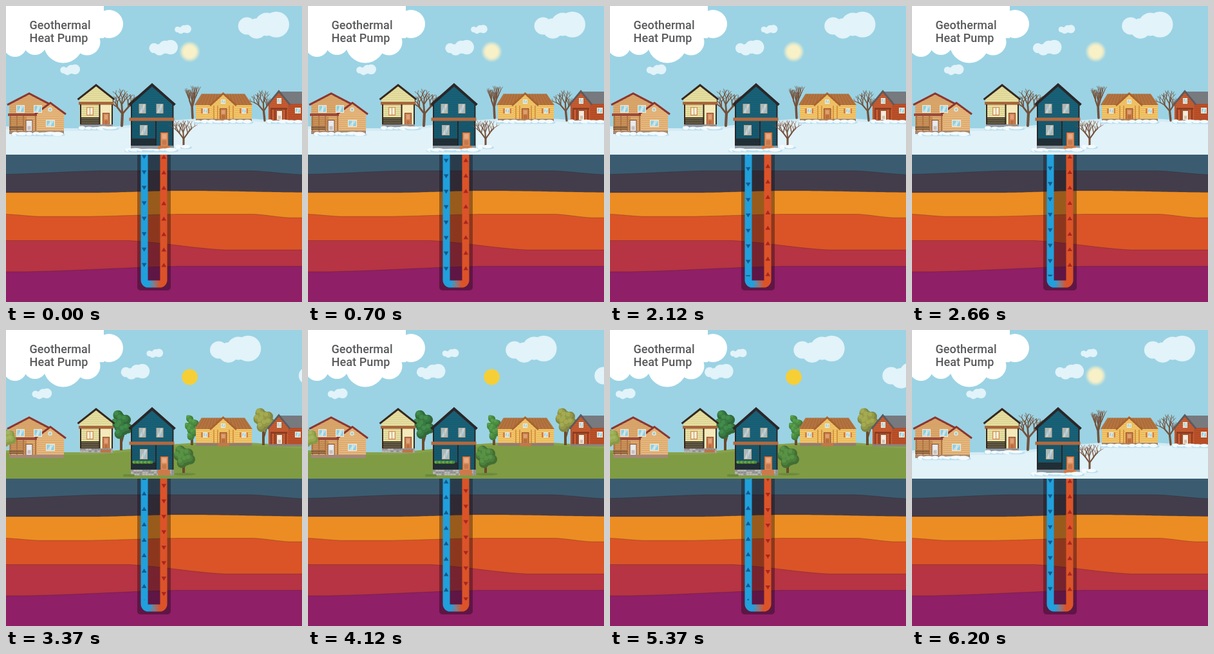
Animation, 460 px wide and 460 px high, one loop 6.25 s. Source, as an HTML page with a canvas:

```html
<!DOCTYPE html>
<html lang="en">
<head>
<meta charset="utf-8">
<title>Geothermal Heat Pump</title>
<style>
html, body { margin: 0; width: 100%; height: 100%; overflow: hidden; background: #9bd3e4; }
canvas { position: absolute; left: 0; top: 0; width: 460px; height: 460px; }
h1 { position: absolute; left: 36.5px; top: 20px; margin: 0; font: 500 18px/19.5px Roboto, sans-serif;
  letter-spacing: .1px; color: #58595b; white-space: nowrap; }
</style>
</head>
<body>
<canvas id="stage"></canvas>
<h1>Geothermal<br>Heat Pump</h1>
<script>
const SIZE = 460, GROUND = 231, LOOP = 6250, CUT = 3170, RESET = 6200;
const dpr = window.devicePixelRatio || 1;
let g;

function context(canvas) {
  canvas.width = canvas.height = SIZE * dpr;
  const c = canvas.getContext('2d');
  c.scale(dpr, dpr);
  return c;
}
function random(seed) { return () => (seed = seed * 16807 % 2147483647) / 2147483647; }

// shapes
function trace(pts) {
  g.beginPath();
  pts.forEach(p => g.lineTo(...p));
}
function poly(color, pts) { trace(pts); g.closePath(); g.fillStyle = color; g.fill(); }
function line(color, width, pts) { trace(pts); g.strokeStyle = color; g.lineWidth = width; g.stroke(); }
function box(color, x, y, w, h) { g.fillStyle = color; g.fillRect(x, y, w, h); }
function oval(color, x, y, rx, ry = rx) {
  g.beginPath(); g.ellipse(x, y, rx, ry, 0, 0, 7); g.fillStyle = color; g.fill();
}

// a layer whose top edge climbs or falls in eased steps [from, to, change]
function layer(color, top, steps, edge) {
  const pts = [];
  for (let x = 0; x <= SIZE; x += 5) {
    pts.push([x, steps.reduce((y, [a, b, change]) => {
      const k = Math.min(1, Math.max(0, (x - a) / (b - a)));
      return y + change * (k + k * k * (3 - 2 * k)) / 2;
    }, top)]);
  }
  poly(color, [...pts, [SIZE, SIZE], [0, SIZE]]);
  if (edge) line(edge, .6, pts);
}

// building parts
function siding(color, pts) {
  g.save();
  poly(color, pts);
  g.clip();
  for (let y = pts[0][1] - 40; y < GROUND; y += 3.2) box('rgba(50,30,0,.17)', 0, y, SIZE, .8);
  g.restore();
}
function gable(color, roof, thick, x, half, apex, eave, bottom) {
  const over = 3, drop = eave + over * (eave - apex) / half;
  siding(color, [[x - half, eave], [x, apex], [x + half, eave], [x + half, bottom], [x - half, bottom]]);
  line(roof, thick, [[x - half - over, drop], [x, apex], [x + half + over, drop]]);
}
function slope(color, left, right, top, bottom, leanL, leanR) {
  poly(color, [[left, top], [right, top], [right + leanR, bottom], [left + leanL, bottom]]);
  for (let k = 0; k < 1; k += .06) {
    const x = left + k * (right - left);
    line('rgba(50,25,15,.2)', .7, [[x, top], [x + leanL + k * (leanR - leanL), bottom]]);
  }
}
function pane(x, y, w, h, frame = '#f4ead7', glass = '#8fcfe0') {
  box(frame, x, y, w, h);
  box(glass, x + 1.2, y + 1.2, w - 2.4, h - 2.4);
  poly('rgba(255,255,255,.4)', [[x + w * .6, y + 1.2], [x + w - 1.2, y + 1.2], [x + w / 2, y + h - 1.2], [x + 1.2, y + h - 1.2]]);
  box(frame, x + w / 2 - .5, y, 1, h);
}
function door(color, x, y, w, h) {
  box('#8a4a2c', x - 1, y - 1, w + 2, h + 1);
  box(color, x, y, w, h);
  box('rgba(255,255,255,.25)', x + 2, y + 2, w - 4, h * .35);
  box('rgba(90,40,20,.2)', x + 2, y + h * .55, w - 4, h * .35);
}
function posts(color, y, h, ...xs) { xs.forEach(x => box(color, x, y, 2, h)); }
function rails(color, x, y, w, h) {
  box('rgba(25,22,25,.5)', x, y, w, h);
  for (let i = 0; i <= h; i += 3.2) box(color, x, y + i, w, 1.5);
}
function footing(summer, x, y, w, h) {
  box(summer ? '#a3a3a1' : '#8d979f', x, y, w, h);
  if (!summer) return;
  const rnd = random(x);
  for (let j = 1.5; j < h; j += 3)
    for (let i = 2; i < w - 1; i += 4.5) oval(rnd() < .5 ? '#8b8c8d' : '#bcb8b2', x + i, y + j, 2, 1.2);
}

// houses
function cottage() {
  const roof = '#8b3630';
  gable('#dfa96d', roof, 3, 36, 31, 136, 152, 198);
  box('rgba(150,90,40,.3)', 5, 172, 27, 21);
  box('#9b4a3a', 3, 167, 45, 4);
  gable('#e9b87c', roof, 3, 69, 21, 150.5, 166, 198);
  pane(16, 154, 13, 12); pane(43, 154, 13, 12); pane(62, 177, 14, 11);
  oval('#f4ead7', 68.5, 161, 3.2); oval('#8fcfe0', 68.5, 161, 2);
  door('#e3e5e8', 31.5, 178, 9, 16);
  posts('#b27544', 171, 23, 6, 16, 26, 45);
  rails('#c08650', 5, 186, 22, 6);
  box('#a48775', 5, 194, 85, 5);
}
function cabin(summer) {
  const dark = '#35271f';
  gable('#e9e2a2', dark, 3, 140, 25.5, 123, 143, 185);
  box('#a7653a', 113, 149, 54, 4.5);
  box('#f4e9bb', 147, 154, 18, 31);
  pane(125, 157, 11, 13, '#d08b54', '#f7edcf');
  door('#d2814f', 151, 167, 9, 20);
  posts(dark, 153, 33, 115, 144.5, 164);
  rails(dark, 116, 173, 29, 10);
  footing(summer, 115, 184, 51, summer ? 7 : 5);
  box('#bd734a', 147, 186, 16, 4.5);
}
function tealHouse(summer) {
  const dark = '#2b2628', frame = '#c8a98c', glass = '#9dbdc9';
  gable('#17627a', dark, 4, 227, 32.5, 122.5, 151, 218);
  box('rgba(8,35,50,.14)', 195, 179, 65, 39);
  posts(dark, 150, 68, 194, 258.5);
  posts(dark, 179, 39, 232);
  pane(206.5, 152, 11, 15, frame, glass);
  pane(233.5, 152, 11, 15, frame, glass);
  pane(208, 185, 12, 16, frame, glass);
  box('#b5683d', 191.5, 173.5, 70, 5);
  door('#df8d5b', 240.5, 197, 11, 21);
  rails(dark, 196, 206, 37, 11);
  if (summer) for (let x = 199; x < 229; x += 3) oval(x % 2 ? '#71a83e' : '#4f8a36', x, 205.5, 2.6, 2.2);
  footing(summer, 194, 217, 67, summer ? 9 : 6);
  box('#cd7a4b', 236, 217, 19, 9);
}
function bungalow() {
  const wood = '#f6c768';
  siding(wood, [[295, 151], [382, 151], [382, 178], [295, 178]]);
  slope('#b4733f', 304, 371, 136.5, 154, -11, 12);
  gable(wood, '#a8622f', 3, 337.5, 17.5, 136, 152, 177);
  pane(334, 145, 7, 7);
  [303, 363].forEach(x => { box('#d8813f', x, 159, 13, 8); pane(x + 3, 159, 7.5, 8); });
  door('#cf8045', 333, 160, 9.5, 17);
  posts('#d9953f', 155, 22, 322, 328, 346, 352);
  box('#937b70', 295, 175.5, 87, 4.5);
  box('#c07a49', 329, 176, 18, 5);
}
function brickHouse() {
  siding('#bd5029', [[408, 151], [460, 151], [460, 179], [408, 179]]);
  slope('#7b8086', 424, 466, 133, 152, 13, 9);
  gable('#c85c32', '#5d5a5d', 2.8, 424, 14.5, 132.5, 150, 179);
  pane(421, 143, 7, 9); pane(449, 158, 9, 9);
  box('#8e3d22', 411, 158, 26, 3);
  door('#f1e6d6', 421, 163, 8, 14);
  posts('#8b3a20', 160, 18, 411, 417, 434);
  box('#8b857f', 408, 177.5, 52, 3.5);
}

// plants and snow
function bareTree(x, base, height, spread, lean, seed) {
  const rnd = random(seed);
  g.lineCap = 'round';
  (function branch(x, y, angle, len, w, depth) {
    const ex = x + Math.sin(angle) * len, ey = y - Math.cos(angle) * len;
    line('#74503a', w, [[x, y], [ex, ey]]);
    if (!depth) return;
    for (let side = -1; side < 2; side += depth > 2 ? 1 : 2)
      branch(ex, ey, angle * .6 + (side * .65 + (rnd() - .5) * .4) * spread, len * (.58 + rnd() * .25), w * .66, depth - 1);
  })(x, base, lean, height * .34, height / 13, 4);
  g.lineCap = 'butt';
}
function leafTree(x, base, y, rx, ry, hue, light) {
  line('#6b4a2c', 4, [[x, base], [x, y]]);
  line('#6b4a2c', 1.6, [[x, base - 8], [x + rx * .5, y]]);
  for (let shade = 0; shade < 3; shade++)
    for (let i = 0; i < 9; i++) {
      const a = i * 2.4, d = Math.sqrt(i / 9) * .68, r = rx * (.46 - shade * .13);
      oval(`hsl(${hue} 36% ${light + shade * 5}%)`, x + Math.cos(a) * d * rx - shade * 1.6, y + Math.sin(a) * d * ry - shade * 1.8, r);
    }
}
function drift(from, to, y) {
  const rnd = random(from + y);
  for (let x = from; x < to; x += 11) {
    const r = 5 + rnd() * 6;
    oval('#b9dff0', x + 1, y + 1, r + 2, 2.3);
    oval('#f4fafd', x, y - rnd(), r, 1.5 + rnd() * 2);
  }
}

function hills(summer) {
  const shape = [[0, 95, 3], [130, 300, -15], [370, 460, 5]];
  layer(summer ? '#87a34a' : '#d3ebf5', 187, shape);
  layer(summer ? '#7f9b44' : '#e1f2f9', 191, shape);
}
function ground() {
  const edge = 'rgba(40,20,30,.45)';
  layer('#3b5c70', GROUND, []);
  layer('#433d4b', 261.5, [[0, 150, -5.5], [380, 460, 6]], edge);
  layer('#ec8d23', 290, [[140, 260, -3], [300, 460, 2.5]], edge);
  layer('#da5427', 323.5, [[0, 50, 3.5], [130, 270, -3.5], [385, 440, 5.5]], edge);
  layer('#b63443', 364.5, [[190, 340, 14.5]], edge);
  layer('#8f1f67', 413, [[30, 270, -8.5]], edge);
}
function pipe() {
  g.beginPath(); g.roundRect(204, GROUND, 52, 442 - GROUND, [0, 0, 5, 5]);
  g.fillStyle = 'rgba(15,8,15,.38)'; g.fill();
  const blend = g.createLinearGradient(222, 0, 239, 0);
  blend.addColorStop(0, '#20a0dc'); blend.addColorStop(.5, '#887c86'); blend.addColorStop(1, '#dc5328');
  g.beginPath(); g.moveTo(215, GROUND);
  g.arcTo(215, 432, 245, 432, 6); g.arcTo(245, 432, 245, GROUND, 6); g.lineTo(245, GROUND);
  g.strokeStyle = blend; g.lineWidth = 11; g.stroke();
  const rnd = random(77);
  for (let i = 0; i < 45; i++) {
    const k = rnd();
    box(rnd() > k ? '#3e9bcb' : '#cd5a37', 224 + k * 13, 427.5 + rnd() * 8.5, 1, 1);
  }
}

function scenery(summer) {
  const canvas = document.createElement('canvas');
  g = context(canvas);
  hills(summer);
  if (summer) {
    leafTree(179, 187, 147, 17, 27, 128, 30);
    leafTree(289, 179, 152, 12, 26, 112, 36);
    leafTree(400, 179, 140, 17, 20, 64, 39);
  } else {
    bareTree(180, 186, 54, .8, .05, 11);
    bareTree(290, 174, 46, .35, -.05, 29);
    bareTree(402, 178, 43, .75, -.1, 53);
  }
  cottage(); cabin(summer); bungalow(); brickHouse(); tealHouse(summer);
  if (summer) {
    leafTree(276, 223, 197, 17, 18, 105, 32);
    leafTree(0, 180, 167, 15, 15, 72, 44);
    for (let x = 185; x < 199; x += 4) oval('#6a8a3c', x, 226, 3, 2);
    oval('#6e8a3d', 278, 224, 17, 2);
  } else {
    bareTree(276, 220, 40, .75, 0, 91);
    drift(14, 88, 199); drift(118, 172, 190); drift(190, 262, 224);
    drift(298, 384, 180); drift(410, 460, 180); drift(268, 284, 219);
  }
  ground();
  pipe();
  return canvas;
}

// sky
function cloud(x, y, w, h) {
  for (let i = 0; i < 4; i++)
    oval('#e2f3f9', x + w * (.18 + .19 * i), y + h * (.5 + .09 * Math.sin(i * 1.9)), w * (.17 + .027 * i));
}
function header() {
  box('#fff', 0, 0, 152, 50);
  [[160, 28, 22], [126, 56, 20.5], [89, 58, 30.5], [45, 58, 18], [14, 61, 18]].forEach(c => oval('#fff', ...c));
}
function sun(summer) {
  if (summer) return oval('#f6cf36', 285.5, 73, 12.3);
  const glow = g.createRadialGradient(285.5, 71, 9, 285.5, 71, 17);
  glow.addColorStop(0, '#f8f1c8');
  glow.addColorStop(.4, 'rgba(238,236,200,.8)');
  glow.addColorStop(1, 'rgba(205,228,210,0)');
  oval(glow, 285.5, 71, 17);
}
function arrows(x, color, shift, dir) {
  for (let y = 210.5 + (shift % 24 + 24) % 24; y < 430; y += 24)
    poly(color, [[x - 3.8, y - 3 * dir], [x + 3.8, y - 3 * dir], [x, y + 3.2 * dir]]);
}

const winterView = scenery(false), summerView = scenery(true);
const view = context(document.getElementById('stage'));
const FAST = 42.86, SLOW = 27.2, SLOW_SUMMER = 24.8;

function draw(ms) {
  g = view;
  const t = ms >= RESET ? 0 : ms / 1000;
  const summer = t >= CUT / 1000;
  box('#9bd3e4', 0, 0, SIZE, SIZE);
  sun(summer);

  g.save();
  g.translate(-13 * t - 4.5 * Math.max(0, t - 4.12), 0);
  cloud(360, 8, 80, 46);
  cloud(262, 29, 26, 15);
  cloud(222, 51, 45, 29);
  cloud(84, 89, 31, 21);
  cloud(498, 48, 80, 46);
  g.restore();

  header();
  g.drawImage(summer ? summerView : winterView, 0, 0, SIZE, SIZE);

  g.save();
  g.beginPath(); g.rect(204, GROUND, 52, 420 - GROUND); g.clip();
  const s = t - 3.19, dir = summer ? -1 : 1;
  arrows(214.7, '#0e5a8c', summer ? -SLOW_SUMMER * s : FAST * t, dir);
  arrows(245.3, '#a8261f', summer ? FAST * s : -SLOW * t, -dir);
  g.restore();
}

const began = performance.now();
function tick() {
  draw((performance.now() - began) % LOOP);
  requestAnimationFrame(tick);
}
tick();
</script>
</body>
</html>
```
